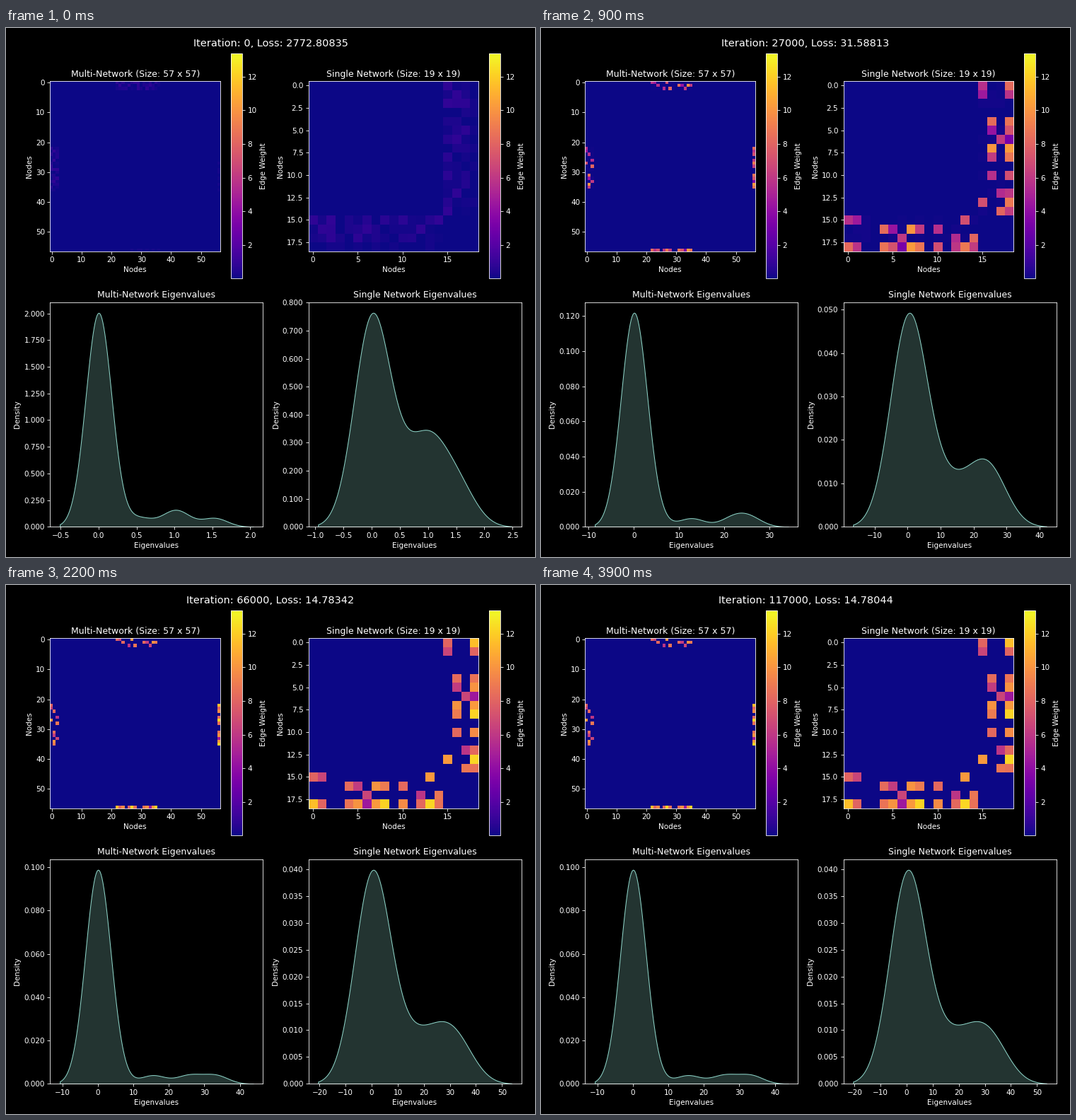
Animation, 748 px wide and 748 px high, one loop 5900 ms. Source, as a matplotlib script:

```python
import numpy as np
import matplotlib.pyplot as plt
from matplotlib.animation import FuncAnimation

plt.style.use("dark_background")
plt.rcParams["font.family"] = "DejaVu Sans"

STEPS, HOLD = 40, 19
ITERATIONS_PER_STEP = 3000
ACCENT = "#8dd3c7"

# Final (hub weight, sink weight) of the nodes that settle on each hub
HUBS = {
    15: {0: (8, 11.5), 1: (6.6, 8), 13: (10.2, 12.3)},
    16: {4: (8.3, 8.7), 5: (6.2, 10), 7: (10, 10.2), 8: (9, 12.2), 10: (8.2, 9.7)},
    17: {6: (6.6, 4.5), 12: (5.9, 8.2), 14: (8.8, 8.6)},
}
SINK, SHARED_HUB = 18, 17
EARLY_NODES = (4, 7)

# Position of every single-network node inside the multi-network
PLACE = np.r_[22:24, 29:37, 24:29, 0:3, 56]

NOISE = .9 * np.random.default_rng(4).random((4, 15)) ** 2
NOISE[-1] *= .25

LOSS_FLOOR = 14.780439
LOSS_POINTS = {0: 2772.80835, 5: 623.84381, 9: 31.58813, 13: 16.03794,
               17: 14.83042, 28: 14.78054, 39: 14.78044}


def ramp(t, start, end):
    u = np.clip((t - start) / (end - start), 0, 1)
    return u * u * (3 - 2 * u)


def loss_at(step):
    """Geometric decay of the excess loss between the known points."""
    excess = np.log(np.array(list(LOSS_POINTS.values())) - LOSS_FLOOR)
    return LOSS_FLOOR + np.exp(np.interp(step, list(LOSS_POINTS), excess))


def weights_at(step):
    """Noise fades, late nodes briefly share one hub, then each finds its own."""
    weights = np.zeros((19, 19))
    weights[15:, :15] = NOISE * np.exp(-step / 5)
    shared = 2.6 * np.exp(-((step - 5) / 2) ** 2)
    for hub, nodes in HUBS.items():
        for node, (hub_weight, sink_weight) in nodes.items():
            if node in EARLY_NODES:
                to_hub = to_sink = ramp(step, 0, 9)
            else:
                to_sink = ramp(step, 1.5, 13)
                if hub == SHARED_HUB:
                    to_hub = ramp(step, 0, 11)
                else:
                    to_hub = ramp(step, 4, 12)
                    weights[SHARED_HUB, node] += shared
            weights[hub, node] += hub_weight * to_hub
            weights[SINK, node] += sink_weight * to_sink
    return weights + weights.T


def spectrum_at(step):
    """Non-zero eigenvalue magnitudes; each occurs twice, the rest are zero."""
    first = np.array([.54, .97, 1.07, 1.41])
    last = np.array([3, 15.5, 25.7, 33.1])
    begin = np.array([3, 3.3, 0, -.5])
    end = np.array([9, 11.2, 11.9, 13.4])
    return first + (last - first) * ramp(step, begin, end)


def density(pairs, count):
    """Gaussian kernel density with Scott's bandwidth, cut at three widths."""
    data = np.zeros(count)
    data[:2 * len(pairs)] = np.repeat(pairs, 2)
    width = data.std(ddof=1) * count ** -0.2
    x = np.linspace(-3 * width, data.max() + 3 * width, 200)
    z = (x[:, None] - data) / width
    return x, np.exp(-z * z / 2).sum(axis=1) / (count * width * np.sqrt(2 * np.pi))


def heatmap(ax, title, count):
    image = ax.imshow(np.zeros((count, count)), cmap="plasma",
                      vmin=.017, vmax=13.35)
    fig.colorbar(image, ax=ax, label="Edge Weight")
    ax.set(title=f"{title} (Size: {count} x {count})",
           xlabel="Nodes", ylabel="Nodes")
    return image


def density_plot(ax, title):
    ax.set(title=f"{title} Eigenvalues", xlabel="Eigenvalues", ylabel="Density")
    ax.yaxis.set_major_formatter("{x:.3f}")
    return ax.fill_between([0, 1], 0, [0, 1], facecolor=(ACCENT, .25),
                           edgecolor=ACCENT, linewidth=1)


def update_density(area, pairs, count):
    x, y = density(pairs, count)
    area.set_verts([np.column_stack([np.r_[x, x[::-1]], np.r_[y, 0 * y]])])
    margin = .05 * np.ptp(x)
    area.axes.set_xlim(x[0] - margin, x[-1] + margin)
    area.axes.set_ylim(0, 1.05 * y.max())


fig, axes = plt.subplots(2, 2, figsize=(10, 10), dpi=74.8)
heading = fig.suptitle("", fontsize=14)
multi_image = heatmap(axes[0, 0], "Multi-Network", 57)
single_image = heatmap(axes[0, 1], "Single Network", 19)
multi_area = density_plot(axes[1, 0], "Multi-Network")
single_area = density_plot(axes[1, 1], "Single Network")


def update(frame):
    step = min(frame, STEPS - 1)
    heading.set_text(f"Iteration: {step * ITERATIONS_PER_STEP}, "
                     f"Loss: {loss_at(step):.5f}")

    single = weights_at(step)
    multi = np.zeros((57, 57))
    multi[np.ix_(PLACE, PLACE)] = single
    single_image.set_data(single)
    multi_image.set_data(multi)

    pairs = spectrum_at(step)
    update_density(multi_area, pairs, 57)
    update_density(single_area, pairs, 19)
    return []


update(0)
fig.tight_layout()
animation = FuncAnimation(fig, update, frames=STEPS + HOLD, interval=100,
                          init_func=lambda: update(0), repeat=True)
plt.show()
```
